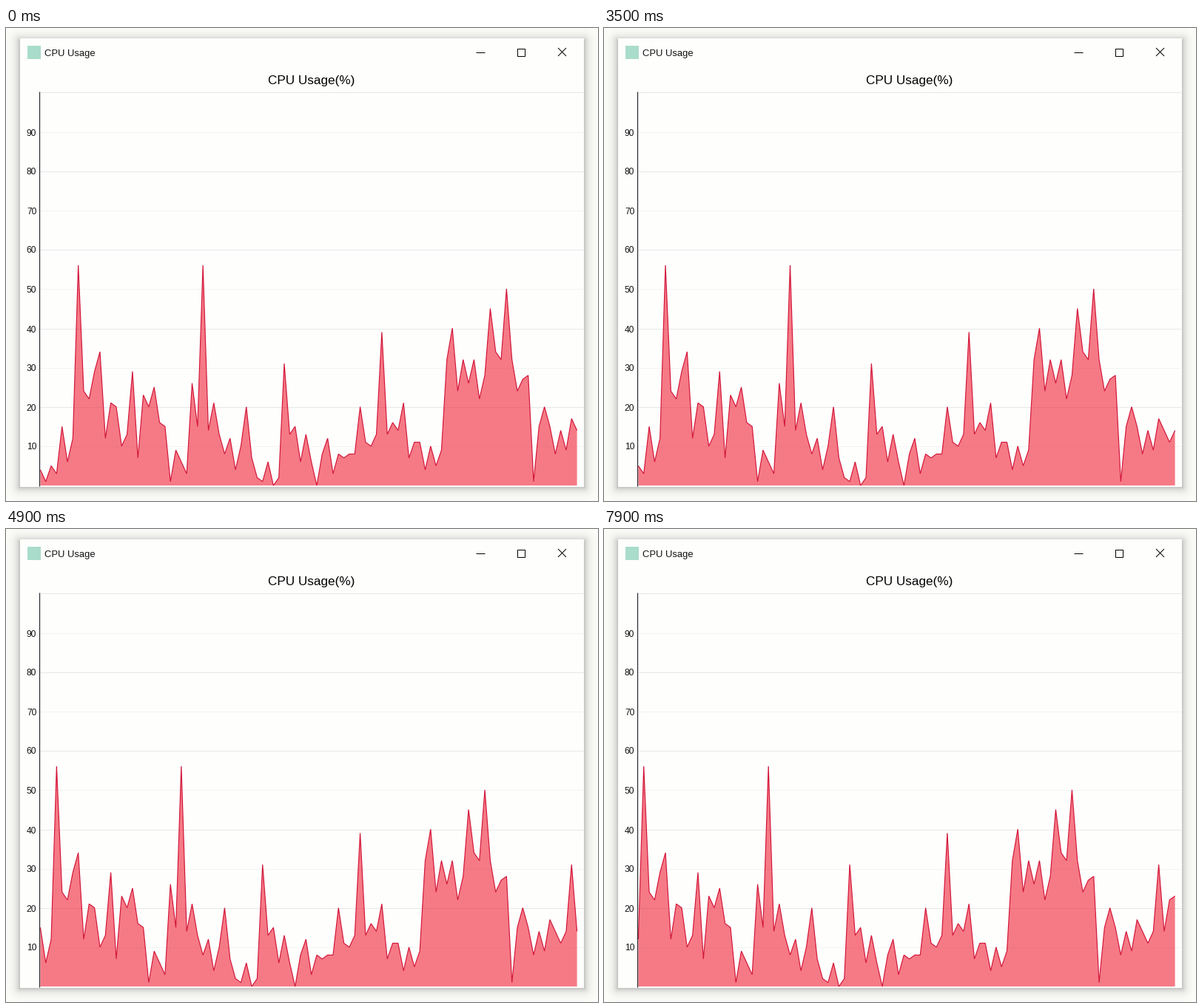
Animation of 800 by 640 pixels, one loop 8 s. Source, as a matplotlib script:

```python
import numpy as np
import matplotlib.pyplot as plt
from matplotlib.animation import FuncAnimation
from matplotlib.patches import Rectangle

W, H = 800, 640
DPI = 100
PX = 72 / DPI  # points per pixel

LOAD = [
    4, 1, 5, 3, 15, 6, 12, 56, 24, 22, 29, 34, 12, 21, 20, 10, 13, 29, 7, 23,
    20, 25, 16, 15, 1, 9, 6, 3, 26, 15, 56, 14, 21, 13, 8, 12, 4, 10, 20, 7,
    2, 1, 6, 0, 2, 31, 13, 15, 6, 13, 6, 0, 8, 12, 3, 8, 7, 8, 8, 20,
    11, 10, 13, 39, 13, 16, 14, 21, 7, 11, 11, 4, 10, 5, 9, 32, 40, 24, 32, 26,
    32, 22, 28, 45, 34, 32, 50, 32, 24, 27, 28, 1, 15, 20, 15, 8, 14, 9, 17, 14,
    11, 14, 31, 14, 22, 23,
]
SPAN = 100                         # samples visible at once
TICKS = [13, 25, 36, 48, 59, 70]   # when a new sample arrives, in 100 ms units
LEFT, TOP, RIGHT, BOTTOM = 19, 14, 781, 621
BASE, SCALE = 619, 5.322

fig = plt.figure(figsize=(W / DPI, H / DPI), dpi=DPI)
ax = fig.add_axes([0, 0, 1, 1])
ax.set_xlim(0, W)
ax.set_ylim(H, 0)
ax.axis("off")


def level(v):
    return BASE - SCALE * np.asarray(v)


def line(xs, ys, color="black", width=1.0, **kw):
    return ax.plot(xs, ys, color=color, lw=width * PX,
                   solid_capstyle="butt", **kw)[0]


def label(x, y, text, size, **kw):
    ax.text(x, y, text, fontsize=size * PX, family="Liberation Sans",
            va="baseline", **kw)


def shadow():
    y, x = np.mgrid[0:H, 0:W] + 0.5
    dx = np.maximum(np.maximum(LEFT - x, x - RIGHT), 0)
    dy = np.maximum(np.maximum(TOP + 3 - y, y - BOTTOM), 0)
    dark = 0.24 * np.exp(-np.hypot(dx, dy) / 5.5)
    page = np.array([253, 254, 250]) / 255
    ax.imshow(page * (1 - dark[..., None]), extent=(0, W, H, 0),
              interpolation="nearest", aspect="auto", zorder=0)


def window():
    ax.add_patch(Rectangle((LEFT, TOP), RIGHT - LEFT, BOTTOM - TOP,
                           fc="#fefefd", ec="none", zorder=1))
    ax.add_patch(Rectangle((29, 24), 18, 18, fc="#a9dccb", ec="none", zorder=2))
    label(52, 38, "CPU Usage", 13, color="#111111")
    line([635, 647], [32.5, 32.5])
    line([690.5, 700.5, 700.5, 690.5, 690.5, 700.5],
         [27.5, 27.5, 37.5, 37.5, 27.5, 27.5])
    line([746, 757], [27, 38])
    line([746, 757], [38, 27])


def chart_frame():
    label(412.5, 76, "CPU Usage(%)", 17.1, ha="center")
    for v in range(10, 101, 10):
        y = np.floor(level(v)) + 0.5
        line([46, 780], [y, y], "#e6e8e8" if v % 20 == 0 else "#f2f3f2",
             zorder=2)
        if v < 100:
            label(41.3, y + 5, str(v), 12, ha="right", color="#111111")
    line([45.2, 45.2], [86, 620], "#303336", 1.3, zorder=5)


shadow()
window()
chart_frame()

xs = np.linspace(46.4, 771.6, SPAN)
area, = ax.fill(xs, xs, fc=(237 / 255, 5 / 255, 29 / 255, 0.53), ec="none",
                zorder=3)
curve = line(xs, xs, "#d3173a", 1.2, zorder=4, solid_joinstyle="bevel")


def update(i):
    start = np.searchsorted(TICKS, i, side="right")
    ys = level(LOAD[start:start + SPAN])
    curve.set_data(xs, ys)
    area.set_xy(np.column_stack([np.r_[xs[0], xs, xs[-1]],
                                 np.r_[BASE, ys, BASE]]))
    return area, curve


anim = FuncAnimation(fig, update, frames=80, interval=100, repeat=True,
                     repeat_delay=0)
plt.show()
```
